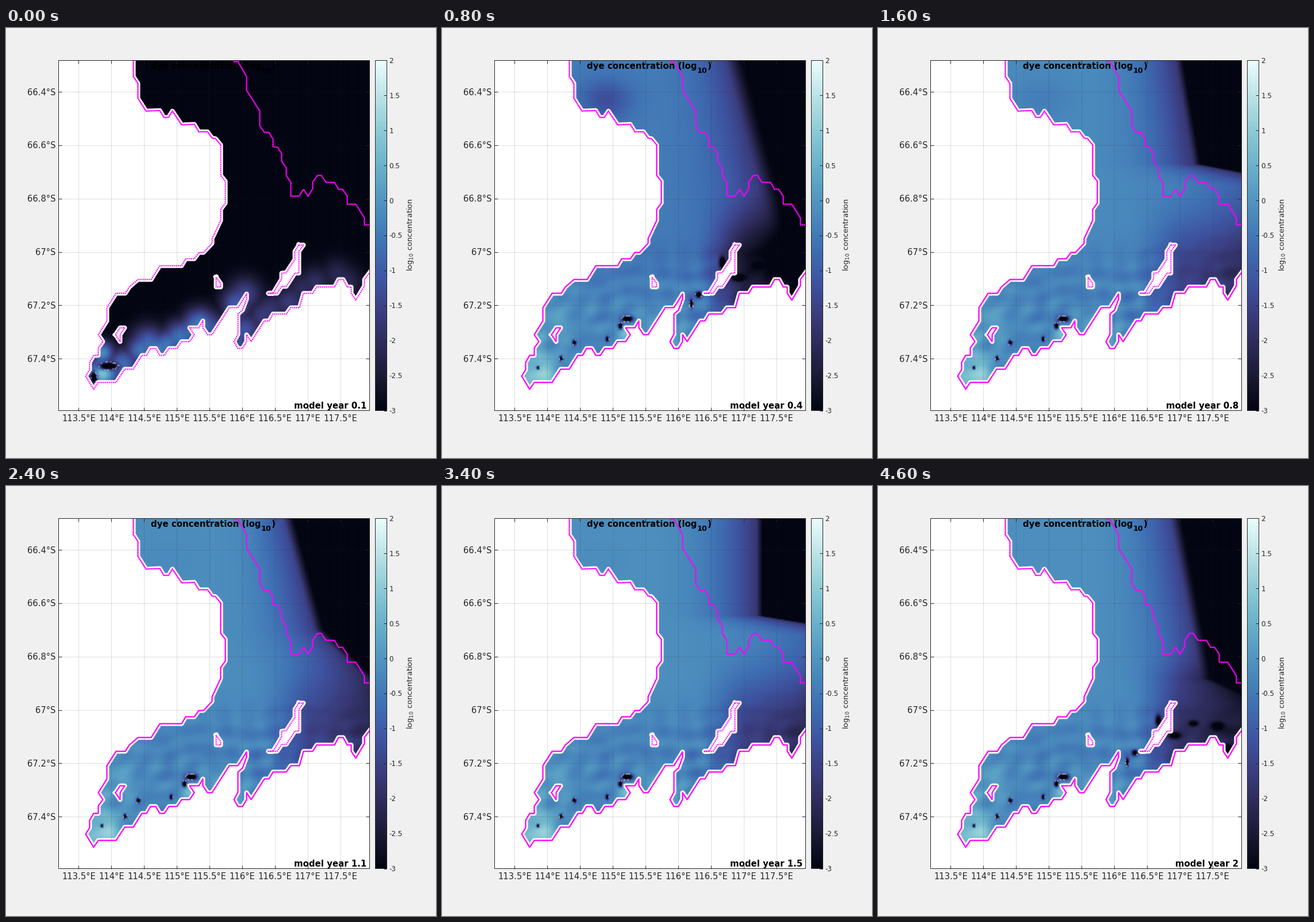
Write a matplotlib script that moves like this. It is 748x748 px and loops after 4.8 s.

```python
import numpy as np
import matplotlib.pyplot as plt
from matplotlib.animation import FuncAnimation
from matplotlib.colors import LinearSegmentedColormap
from matplotlib.patches import Polygon, Rectangle

SIZE, DPI, FRAMES = 748, 64, 24
PT = 72 / DPI                      # points per pixel
L, R, T, B = 91, 632, 56, 666      # map box
DARK, PINK = (0.15, 0.15, 0.15), "#ff00ff"
DOTS, STRIPES = (0, (.85, .6)), (0, (.5, .55))

plt.rcParams["font.family"] = "DejaVu Sans"
plt.rcParams["mathtext.fontset"] = "dejavusans"

ICE = LinearSegmentedColormap.from_list("ice", [
    "#030512", "#191933", "#2c2a57", "#3a3c7d", "#3e53a0", "#3e6db2",
    "#4886bb", "#599fc4", "#72b8cd", "#95cfd8", "#c0e5e8", "#eafcfd"])

# corners of the coast, in pixels
NORTH = [(221, 56), (221, 84), (229, 96), (229, 122), (243, 144), (267, 143),
         (274, 155), (282, 155), (289, 144), (305, 168), (327, 167), (335, 180),
         (350, 180), (358, 191), (364, 192), (373, 203)]
WEST = [(373, 203), (373, 256), (381, 266), (381, 304), (373, 315), (373, 334),
        (358, 366), (358, 374), (343, 390), (335, 390), (327, 401), (312, 401),
        (305, 413), (267, 413), (252, 437), (229, 437), (214, 450), (207, 461),
        (191, 461), (175, 486), (175, 509), (160, 533), (168, 545), (160, 556),
        (160, 569), (152, 569), (145, 581), (145, 594), (138, 605), (152, 628),
        (160, 616)]
SOUTH = [(191, 616), (206, 593), (221, 593), (236, 569), (244, 569), (251, 557),
         (260, 557), (267, 569), (275, 569), (283, 557), (297, 557), (305, 545),
         (319, 545), (327, 533), (319, 521), (335, 521), (342, 509), (342, 521),
         (350, 533), (358, 533), (388, 486), (403, 486), (418, 462), (418, 471),
         (411, 490), (403, 497), (403, 532), (396, 545), (403, 557), (411, 557),
         (418, 545), (418, 533), (426, 545), (449, 509), (457, 509), (464, 497),
         (487, 497), (495, 486), (510, 486), (517, 461), (533, 461), (540, 450),
         (571, 450), (578, 437), (586, 437), (593, 450), (600, 450), (600, 461),
         (608, 473), (623, 448), (623, 437), (632, 425)]
COAST = WEST + SOUTH
ICE_FRONT = [(396, 58), (403, 58), (418, 84), (418, 108), (441, 144), (441, 170),
             (449, 181), (457, 181), (464, 193), (464, 206), (472, 207),
             (479, 218), (479, 231), (487, 243), (487, 256), (495, 268),
             (495, 292), (509, 292), (517, 280), (525, 292), (533, 279),
             (533, 268), (541, 256), (548, 256), (556, 268), (571, 268),
             (578, 280), (585, 280), (593, 292), (593, 306), (608, 306),
             (623, 330), (623, 342), (632, 342)]
ISLET = [(190, 533), (198, 521), (206, 521), (198, 533), (198, 545), (190, 533)]
ROCK = [(365, 433), (365, 450), (373, 450), (373, 444), (365, 433)]
RIDGE = [(509, 377), (517, 377), (509, 388), (509, 426), (502, 426), (487, 449),
         (479, 449), (471, 461), (456, 461), (464, 461), (479, 436), (479, 426),
         (487, 425), (502, 402), (502, 388), (509, 377)]

# yearly cycle of the dye edge: month, x at the top, lean, y where it turns
# east, slope after the turn, softness, dryness of the east shelf
CYCLE = np.array([
    (0, 504, .27, 250, .8, 25, .9),
    (4, 530, .27, 390, 1.0, 42, 1.6),
    (5, 559, 0, 226, 6.0, 14, 1.0),
    (8, 533, .17, 237, 5.0, 18, .9),
    (9, 506, .12, 225, .9, 22, .9),
    (11, 531, .19, 335, 2.0, 26, 1.4)])

# x, y, strength, radius
GLOWS = [(168, 602, 1.3, 36), (320, 531, .9, 16), (362, 512, .5, 18),
         (405, 545, .6, 22), (185, 510, .45, 50)]

# x, y and radii of spots without dye
HOLES = [(322, 506, 9, 5), (310, 518, 3.5, 5), (167, 591, 2.5, 2.5),
         (230, 547, 3, 4), (207, 575, 3, 4), (287, 541, 2.5, 4)]
DRY_HOLES = [(446, 464, 5, 5), (433, 480, 3, 7), (515, 434, 11, 6),
             (548, 413, 8, 5), (590, 418, 12, 8), (609, 458, 5, 9),
             (487, 408, 5, 10)]
FIRST_HOLES = [(178, 588, 15, 6), (153, 608, 5, 9)]

rng = np.random.default_rng(4)
X, Y = np.meshgrid(np.arange(L + 1, R, 2.0), np.arange(T + 1, B, 2.0))


def smooth(x, a, b):
    u = np.clip((x - a) / (b - a), 0, 1)
    return u * u * (3 - 2 * u)


def bump(x, y, rx, ry):
    return np.exp(-((X - x) / rx) ** 2 - ((Y - y) / ry) ** 2)


# slow streaks on the shelf
STREAKS = np.zeros_like(X)
for _ in range(14):
    a, f, p = rng.uniform(0, np.pi), rng.uniform(.08, .22), rng.uniform(0, 7)
    STREAKS += .045 * np.sin(f * (X * np.cos(a) + Y * np.sin(a)) + p)
STREAKS *= smooth(Y, 340, 470)

SHELF = (STREAKS - .22 * smooth(Y, 330, 450)
         + sum(s * bump(x, y, r, r) for x, y, s, r in GLOWS))
EAST = smooth(X, 435, 535) * smooth(Y, 270, 420)
NORTH_POCKET = bump(285, 125, 45, 35)

# first release: plumes along the south coast, weaker towards the east
plumes = [(168, 600, 3.8, 22), (168, 565, 2.8, 17)]
plumes += [(x - 3, y - 8, 2.6 - 1.8 * (x - 190) / 420 + rng.uniform(-.3, .3),
            rng.uniform(20, 26)) for x, y in SOUTH[1:-6:2]]
FIRST = -3 + sum((s * bump(x, y, r, r) ** .7) ** 5 for x, y, s, r in plumes) ** .2

SPECKS = rng.random(X.shape) > .6
ARRIVAL = .8 * np.clip((600 - Y) / 540, 0, 1)


def field(k):
    top, lean, turn, slope, soft, dry = (
        np.interp(k, CYCLE[:, 0], col, period=12) for col in CYCLE.T[1:])
    edge = top + lean * (Y - T) + slope * np.maximum(Y - turn, 0)
    young = np.exp(-max(k - 4, 0) / 3)

    reach = np.clip((X - 360) / (np.minimum(edge, 760) - 360), 0, 1)
    v = -.12 - .35 * young * smooth(Y, 480, 380) - 1.9 * reach ** 2.4
    v += SHELF - dry * EAST - .8 * young * NORTH_POCKET
    v += (-3.05 - v) * smooth(X, edge - soft, edge)

    grown = np.sqrt(np.clip(1.8 * k / 4 - ARRIVAL, 0, 1))
    v = FIRST + (v - FIRST) * grown

    rim = np.zeros(X.shape, bool)
    for holes, w in ((HOLES, min(k / 3, 1)), (FIRST_HOLES, max(1 - k / 2, 0)),
                     (DRY_HOLES, np.clip(2 * dry - 2, 0, 1) * min(k / 4, 1))):
        for x, y, rx, ry in holes:
            g = w * bump(x, y, rx * 1.2, ry * 1.2) ** 1.5
            v += (-3.4 - v) * np.minimum(1.5 * g, 1)
            rim |= (g > .2) & (g < .38) & (X < 470)
    rgb = ICE(np.clip((v + 3) / 5, 0, 1))[..., :3]
    rgb[rim & SPECKS] = .4 * rgb[rim & SPECKS] + .6
    return rgb


fig = plt.figure(figsize=(SIZE / DPI, SIZE / DPI), dpi=DPI, facecolor="#f0f0f0")
ax = fig.add_axes([0, 0, 1, 1])
ax.axis("off")

ax.add_patch(Rectangle((L, T), R - L, B - T, fc="white", ec="none", zorder=0))
box = Rectangle((L, T), R - L, B - T, transform=ax.transData)
ocean = Polygon(NORTH + COAST[1:] + [(632, 56)], transform=ax.transData)
sea = ax.imshow(field(0), extent=(L, R, B, T), interpolation="bilinear", zorder=1)
sea.set_clip_path(ocean)


def stroke(pts, width, color=PINK, style="-", z=5):
    x, y = np.array(pts).T + .5
    line, = ax.plot(x, y, color=color, lw=width * PT, ls=style, zorder=z,
                    solid_joinstyle="round", dash_capstyle="butt")
    line.set_clip_path(box)
    return line


def label(x, y, s, size, **kw):
    kw.setdefault("color", DARK)
    return ax.text(x, y, s, fontsize=size * PT, zorder=8, **kw)


def rule(xs, ys, alpha=1.0, z=6):
    ax.plot(np.round(xs) + .5, np.round(ys) + .5, color=DARK, lw=PT,
            alpha=alpha, zorder=z, snap=False, solid_capstyle="butt")


def outline(x0, x1):
    rule([x0, x1, x1, x0, x0], [T, T, B - 1, B - 1, T])


for part in (NORTH + COAST[1:], ISLET, ROCK, RIDGE):
    stroke(part, 8, "white", z=2)
for part in (ISLET, ROCK, RIDGE):
    ax.add_patch(Polygon(part, fc="white", ec="none", zorder=2))
for part in (NORTH, ICE_FRONT):
    stroke(part, 1.3)
    stroke(part, 2.9, style=STRIPES)
for part in (RIDGE, ROCK):
    stroke(part, 2.2, style=DOTS)
redrawn = [stroke(COAST, 2.3), stroke(ISLET, 2.2)]

# grid, ticks and labels
for i in range(9):
    x = 126 + 56.95 * i
    rule([x, x], [T, B], .15, 3)
    rule([x, x], [B, B - 6])
    rule([x, x], [T, T + 6])
    label(x + .5, 684, f"{113.5 + i / 2:g}°E", 14.7, ha="center", va="baseline")
for i in range(6):
    y = 111 + 92.85 * i
    rule([L, R], [y, y], .15, 3)
    rule([L, L + 6], [y, y])
    rule([R, R - 6], [y, y])
    label(86.5, y + 5.6, f"{66.4 + i / 5:g}°S", 14.7, ha="right", va="baseline")
outline(L, R)

# colour bar
ax.imshow(np.linspace(1, 0, 256)[:, None], cmap=ICE, extent=(642, 663, B, T),
          interpolation="bilinear", zorder=1)
outline(642, 662)
for i in range(11):
    y = T + 60.95 * i
    rule([662, 657], [y, y])
    label(666.5, y + 4.7, f"{2 - i / 2:g}", 12, va="baseline")
label(704, 360, "log$_{10}$ concentration", 13, rotation=90,
      ha="center", va="center")

bold = dict(color="black", weight="bold", va="baseline")
label(252.3, 70.5, "dye concentration (log", 15, **bold)
label(443.5, 77.5, "10", 12.8, **bold)
label(461.3, 70.5, ")", 15, **bold)
year = label(627, 662, "", 15, ha="right", **bold)

ax.set_xlim(0, SIZE)
ax.set_ylim(SIZE, 0)


def draw(k):
    sea.set_data(field(k))
    for line in redrawn:
        line.set_linestyle(DOTS if k == 0 else "-")
    tenths = int((k + 1) / 12 * 10 + .5)
    year.set_text(f"model year {tenths / 10:g}")
    return [sea, year, *redrawn]


anim = FuncAnimation(fig, draw, frames=FRAMES, interval=200, repeat=True,
                     repeat_delay=0, blit=False)
plt.show()
```
